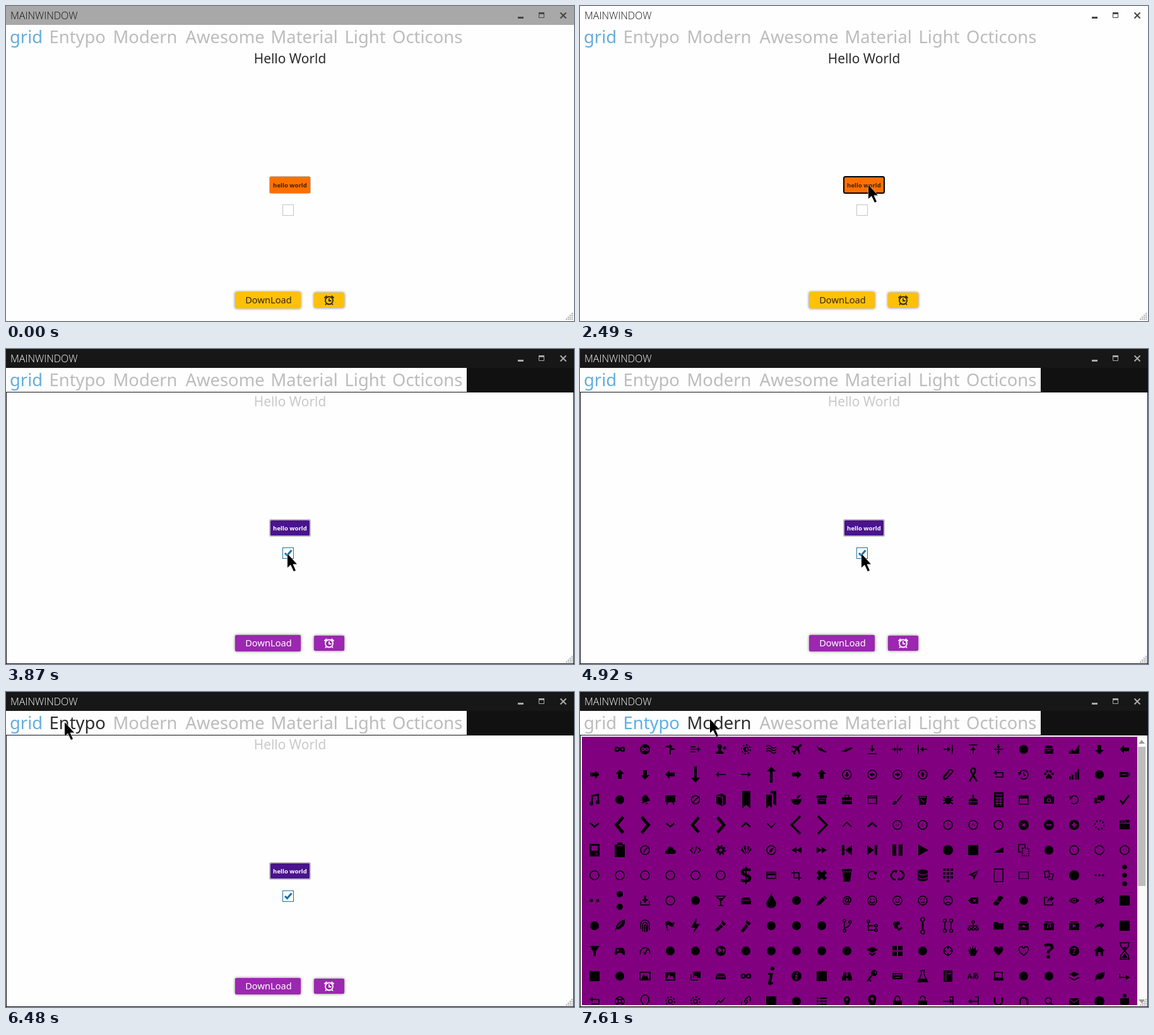
An HTML page that plays this animation: 900 px wide and 500 px high, repeating every 8000 ms.

```html
<!DOCTYPE html>
<html lang="en">
<head>
<meta charset="utf-8">
<title>Main window</title>
<style>
html, body { margin: 0; width: 100%; height: 100%; overflow: hidden; background: #fefefe; }
svg { display: block; }
#stage {
  font-family: "Noto Sans", "Open Sans", "Noto Sans CJK JP", "Noto Sans CJK SC", sans-serif;
  animation: theme 8s step-end infinite, swatch 8s step-end infinite, tabs 8s step-end infinite;
}

/* Light and dark theme, toggled by the check box */
@keyframes theme {
  0%, 56.125%, 66.5% {
    --bar: #fefefe; --body: #fefefe; --title: #111; --btn: #444;
    --hello: #2a2a2a; --ring: #000; --tick: 0;
  }
  48.375%, 61.5%, 70.375% {
    --bar: #171717; --body: #111; --title: #fff; --btn: #aaa;
    --hello: #c9c9c9; --ring: #bbb; --tick: 1;
  }
}
/* Amber and purple swatch, toggled by the middle button */
@keyframes swatch {
  0%, 31.125%, 36% { --accent: #ffc107; --deep: #ff6f00; --on: #33260a; }
  26.25%, 33.75%, 38.625% { --accent: #9c27b0; --deep: #4a148c; --on: #fff; }
}
@keyframes tabs {
  0% { --t0: #64acdc; --t1: #bcbcbc; --t2: #bcbcbc; }
  80.5% { --t0: #64acdc; --t1: #2d2d2d; --t2: #bcbcbc; }
  87.75% { --t0: #bcbcbc; --t1: #2d2d2d; --t2: #bcbcbc; }
  93.5% { --t0: #bcbcbc; --t1: #5bb0e4; --t2: #2d2d2d; }
}
@keyframes wake { 0%, 1% { opacity: 1; } 4.5%, 100% { opacity: 0; } }
@keyframes focus { 0% { visibility: hidden; } 22.9% { visibility: visible; } }
@keyframes check { 0% { stroke: #c4c4c4; } 42.5% { stroke: #1a72a2; } }
@keyframes page { 0% { visibility: hidden; } 87.75% { visibility: visible; } }
@keyframes appear { 0% { visibility: hidden; } 8.25% { visibility: visible; } }
@keyframes move {
  0%, 8.25% { transform: translate(653px, 122px); }
  10.6% { transform: translate(480px, 150px); }
  12.75% { transform: translate(321px, 200px); }
  14.875% { transform: translate(389px, 242px); }
  16.6% { transform: translate(443px, 334px); }
  17.75%, 20% { transform: translate(449px, 300px); }
  20.375%, 22.375% { transform: translate(449px, 296px); }
  26.25%, 40.75% { transform: translate(457px, 284px); }
  42.5%, 44.375% { transform: translate(446px, 322px); }
  48.375% { transform: translate(446px, 325px); }
  72.5% { transform: translate(446px, 325px); animation-timing-function: ease-in-out; }
  81% { transform: translate(93px, 48px); }
  89.875% { transform: translate(93px, 48px); animation-timing-function: ease-in-out; }
  95.125%, 100% { transform: translate(206px, 43px); }
}

#bar { fill: var(--bar); }
#body { fill: var(--body); }
#wake { fill: #a8a8a8; animation: wake 8s linear infinite; }
#title { font: 300 16px "Open Sans", "Noto Sans", sans-serif; fill: var(--title); }
#controls { fill: none; stroke: var(--btn); }
#tabs { font-size: 27.4px; fill: #bcbcbc; }
#hello { font-size: 20.9px; fill: var(--hello); }
#small { font-size: 9.6px; font-weight: 700; fill: var(--on); }
#download { font-size: 14.67px; fill: var(--on); }
#focus { stroke: var(--ring); animation: focus 8s step-end infinite; }
#check { animation: check 8s step-end infinite; }
#tick { opacity: var(--tick); }
#actions { fill: var(--accent); filter: drop-shadow(0 0 2px #0008); }
#alarm { stroke: var(--on); fill: none; }
#page { animation: page 8s step-end infinite; }
#cursor { animation: move 8s linear infinite, appear 8s step-end infinite; }

#icons { color: #000; font-weight: 700; }
#icons .cut { color: purple; }
#icons path, #icons circle { fill: none; }
#icons .f, #icons .d { fill: currentColor; }
#icons .e, #icons .c { fill: purple; }
#icons .s, #icons .o, #icons .h { stroke: currentColor; stroke-width: 1.6; }
#icons .k { stroke: currentColor; stroke-width: 2.7; }
#icons .x { stroke: purple; stroke-width: 1.3; }
#icons .h { stroke-dasharray: 2 1.5; }
#icons .g { stroke: currentColor; stroke-width: 4; stroke-dasharray: 4 2; }
#icons .r { stroke: currentColor; stroke-width: 2; stroke-dasharray: 1; }
#icons text { fill: currentColor; }
</style>
</head>
<body>
<svg id="stage" width="900" height="500" viewBox="0 0 900 500">
  <rect id="body" width="900" height="500"/>
  <rect id="bar" width="900" height="30"/>
  <rect id="wake" width="900" height="30"/>
  <text id="title" x="7" y="21">MAINWINDOW</text>
  <g id="controls">
    <path d="M811 18.5h9" stroke-width="3"/>
    <path d="M844.5 10v8.5h8V10"/><path d="M844 11.5h9" stroke-width="3"/>
    <path d="M878.5 10.5l9 9m0-9l-9 9" stroke-width="2"/>
  </g>
  <rect y="30" width="730" height="38" fill="#fefefe"/>
  <g id="tabs">
    <text x="6" y="59" style="fill:var(--t0)">grid</text>
    <text x="68.5" y="59" style="fill:var(--t1)">Entypo</text>
    <text x="169.5" y="59" style="fill:var(--t2)">Modern</text>
    <text x="284.5" y="59">Awesome</text>
    <text x="419.5" y="59">Material</text>
    <text x="536.5" y="59">Light</text>
    <text x="612" y="59">Octicons</text>
  </g>
  <rect x="1" y="69" width="898" height="430" fill="#fefefe"/>

  <g text-anchor="middle">
    <text id="hello" x="450" y="91">Hello World</text>
    <rect x="417.5" y="270.5" width="65" height="27" rx="2.5" style="fill:var(--deep)" stroke="#bbb"/>
    <rect id="focus" x="418" y="271" width="64" height="26" rx="2.5" fill="none" stroke-width="2"/>
    <text id="small" x="450" y="288">hello world</text>
    <rect id="check" x="438.5" y="315.5" width="17" height="17" fill="#fff"/>
    <path id="tick" d="M442 324l3.5 3.5 7-8" fill="none" stroke="#1272a8" stroke-width="3"/>
    <g id="actions">
      <rect x="363" y="454" width="104" height="26" rx="2"/>
      <rect x="488" y="455" width="48" height="24" rx="2"/>
    </g>
    <text id="download" x="416" y="472">DownLoad</text>
  </g>
  <g id="alarm" stroke-width="1.8">
    <circle cx="512" cy="467.500" r="6"/>
    <path d="M512 464v4h3.500"/>
    <path d="M504.500 463.500l4-3.500M519.500 463.500l-4-3.500" stroke-width="2"/>
    <path d="M508 472l-2 2.500M516 472l2 2.500"/>
  </g>

  <g id="page">
    <rect x="3" y="71" width="893" height="426" fill="#fafafa"/>
    <rect x="3" y="71" width="880" height="426" fill="purple"/>
    <rect x="884" y="87" width="12" height="221" fill="#bdbdbd"/>
    <path d="M885 82l5-6 5 6zM885 488l5 6 5-6z" fill="#999"/>
    <clipPath id="view"><rect x="3" y="71" width="880" height="426"/></clipPath>
    <g id="icons" clip-path="url(#view)"></g>
  </g>
  <path id="grip" stroke="#aaa" stroke-width="2" stroke-dasharray="2 1"
    d="M898 497h-11M898 494h-8M898 491h-5M898 488h-2"/>
  <path id="cursor" d="M0 0V22L5 17.500L10 28L13 26.500L8.500 16.500H15Z"
    stroke="#fff" stroke-width="1" paint-order="stroke"/>
</svg>

<script>
// Parts are split by "|"; the first letter is the drawing style.
// o ring, d disc, c cut disc, r rays, f fill, e cut fill,
// s line, k thick line, x cut line, h dashes, g blocks, t text
const art = {
  _: '', logo: 'd7', ring: 'o7', disc: 'd8', dotted: 'r7',
  arrow: 'fM8 0L1 7V3H-7V-3H1V-7Z',
  thin: 'sM-8 0H6|fM8 0L3 4V-4Z',
  long: 'fM13 0L5 7V2H-13V-2H5V-7Z',
  inf: 'kM0 0C-3-4-7-4-7 0S-3 4 0 0S7-4 7 0S3 4 0 0',
  sign: 'fM-1-8H1V8H-1ZM-8-4L-5-6H3V-3H-5ZM0-2H5L8 0L5 1H0Z',
  add: 'sM-8-4H0M-8 0H0M-8 4H0M1 0H8M4.5-3.5V3.5',
  user: 'fM-8 7C-8 3-4 4-3 1C-6-4-6-8-2-8S3-4 0 1C1 4 5 3 5 7Z|sM3-2H9M6-5V1',
  bright: 'o3.5|fM0-3A3 3 0 0 0 0 3Z|r7', sun: 'o3|r7',
  waves: 'sM-8-4q4-4 8 0t8 0M-8 0q4-4 8 0t8 0M-8 4q4-4 8 0t8 0',
  plane: 'fM8-8C6-9 4-7 2-4L-7-6L-8-4L-1-1L-4 3L-8 2V4L-5 5L-4 8H-2V4L1 1L4 8L6 7L4-2C7-4 9-6 8-8Z',
  jet: 'fM-8-6L-5-3L7 3Q9 6 5 5L-5 1ZM-2-4L3 3L0 2Z',
  edge: 'sM0-7V3M-7 7H7|fM0 4L-4-1H4Z',
  mid: 'sM0-7V7M-8 0H-3M8 0H3|fM-1 0L-5 3V-3ZM1 0L5 3V-3Z',
  crate: 'fM-7-1H7V7H-7ZM-5-6H5L6-2H-6Z|xM-3 2H3',
  area: 'fM-8 7V4L-3 0L0 3L8-7V7Z',
  clip: 'sM-7 3L2-7Q6-9 8-5L-2 6Q-6 8-6 4L2-4M-7 3Q-9 8-4 8',
  ribbon: 'kM-6 11L3-4C6-12-6-12-3-4L6 11',
  back: 'sM-5 4H7V-3H-5|fM-8-3L-3-7V1Z',
  history: 'sM-6-3A7 7 0 1 1-5 5M0-4V0L3 2|fM-9-4L-3-3L-7 2Z',
  paw: 'd2,-6,-1|d2,-2.5,-5|d2,2.5,-5|d2,6,-1|fM0-1C3 0 6 5 4 7Q0 5-4 7C-6 5-3 0 0-1Z',
  bars: 'fM-8 8V3H-5V8ZM-4 8V0H-1V8ZM1 8V-4H4V8ZM5 8V-9H8V8Z',
  battery: 'fM-8-4H6V4H-8ZM7-2H8V2H7Z|xM-5 0H3',
  music: 'kM-4 5V-6L6-8V3|d3,-5,6|d3,5,4',
  bell: 'fM-7 4C-3 2-6-6 1-7S5 2 8 4ZM-2 6H3L1 8Z',
  board: 'fM-8-7H8V4H-8ZM-5 4H-3L-5 8H-7ZM3 4H5L7 8H5Z',
  no: 'o6.5|sM-4 4L4-4',
  book: 'fM-7-7L2-10L8-6V7L2 10L-7 6Z|xM-6-6L3-4V9',
  mark: 'fM-6-14H7V14L0 8L-6 14Z',
  marks: 'fM-8-8H1V14L-3 9L-8 14ZM-1-14H8V10L3 6V-10H-1Z',
  bowl: 'fM-8-1H8C8 4 5 6 3 8H-3C-5 6-8 4-8-1Z|kM1-2L6-8',
  box: 'fM-8-7H8V-3H-8ZM-7-2H7V7H-7Z|xM-3 1H3',
  case: 'fM-8-4H8V7H-8Z|sM-3-4V-7H3V-4|xM-8 1H8',
  browser: 'sM-7-6H7V6H-7ZM-7-3H7',
  brush: 'fM-8 8C-6 2-4 1-1 3C0 6-4 8-8 8ZM-1 1L7-8L8-7L1 3Z',
  bucket: 'fM-7-6H7L5 8H-5Z|xM-5-4H5M-3-1L2 4',
  bug: 'fM-3-4Q0-9 3-4ZM-5-3H5V2Q4 7 0 7T-5 2Z|sM-8-5L-5-2M8-5L5-2M-8 1H8M-8 7L-4 4M8 7L4 4',
  cake: 'fM-7 0Q0-5 7 0V8H-7Z|kM0-3V-8|xM-7 3H7',
  calc: 'fM-7-12H8V12H-7Z|xM-5-8H6M-5-3H6M-5 2H6M-5 6H6M-2-3V10M3-3V10',
  calendar: 'sM-7-6H7V7H-7ZM-4-8V-4M4-8V-4|fM-7-6H7V-2H-7Z',
  camera: 'fM-8-5H-4L-2-8H3L5-5H8V6H-8Z|c3.5,0,1|d2,0,1',
  ccw: 'sM-5-4A6.5 6.5 0 1 1-5 4|fM-8-6L-2-4L-6 0Z',
  cw: 'sM5-4A6.5 6.5 0 1 0 5 4|fM8-6L2-4L6 0Z',
  chat: 'fM-3-7H8V1H5V4L2 1H-3ZM-8-3H-4V3H2V5H-4L-6 8V5H-8Z',
  check: 'kM-7 1L-3 6L7-7',
  chev: 'kM-7-3L0 3L7-3', slim: 'sM-7-3L0 4L7-3',
  minus: 'kM-4 0H4', plus: 'kM-4 0H4M0-4V4',
  clap: 'fM-8-2H8V7H-8ZM-8-7L7-8L8-4L-8-3Z|xM-5-7L-3-4M0-7L2-4',
  mac: 'fM-8-10H8V10H-8Z|eM-5-7H5V1H-5Z|xM1 6H5',
  clipboard: 'fM-8-9H-4V-12H4V-9H8V11H-8Z|xM-4-7H4',
  clock: 'o7|sM-2 4L0 0L4-4M0 0L-1-1',
  cloud: 'fM-5 6C-10 6-9 0-5 0C-4-7 4-7 5-1C10-1 10 6 5 6Z',
  code: 'sM-4-4L-8 0L-4 4M4-4L8 0L4 4M2-6L-2 6',
  cog: 'd6|r7|c2.5',
  fan: 'fM-1 7L-9-1L-6-4ZM0 7L-4-7H0ZM1 7L3-7L6-5ZM2 7L7-3L9-1Z',
  compass: 'o7|fM4-4L1 2L-4 4L-1-2Z',
  ff: 'fM-8-5L0 0L-8 5ZM0-5L8 0L0 5Z',
  next: 'fM-8-8L3 0L-8 8ZM4-8H8V8H4Z',
  pause: 'fM-8-9H-2V9H-8ZM2-9H8V9H2Z',
  play: 'fM-7-9L9 0L-7 9Z', stop: 'fM-8-8H8V8H-8Z', vol: 'fM-8 4L8-5V4Z',
  copy: 'sM-3 3H-8V-9H2V-4|hM-2-3H8V9H-2Z',
  dollar: 't34$', card: 'sM-7-5H7V5H-7Z|fM-7-3H7V0H-7Z',
  crop: 'sM-4-8V4H8M-8-4H4V8',
  cup: 'fM-8-10H8V-6H-8ZM-7-5H7L5 10H-5Z',
  cycle: 'kM-3 7A7 7 0 0 1-3-7M3-7A7 7 0 0 1 3 7|fM-6-8H0L-2-3ZM6 8H0L2 3Z',
  db: 'fM-8-7Q0-12 8-7V7Q0 12-8 7Z|xM-8-3Q0 2 8-3M-8 3Q0 8 8 3',
  dial: 'gM-6-11V7M0-11V13M6-11V7',
  nav: 'fM8-8L1 8L-1 1L-8-1Z|xM5-5L0 0',
  page: 'sM-7-10H7V10H-7Z',
  docs: 'sM-7-6L0-7L1 2L-6 4ZM2-3L7-2L5 7L-1 6',
  dots: 'd1.7,-6|d1.7|d1.7,6', pair: 'd2.5,-5|d2.5,5',
  download: 'fM-1.5-8H1.5V-2H5L0 4L-5-2H-1.5Z|sM-7 1V7H7V1',
  glass: 'sM-7-7H7L0 1ZM0 0V8M-4 8H4|fM-5-4H5L0 2Z',
  drive: 'fM-8 0H8V6H-8ZM-5-5H5L8-1H-8Z',
  drop: 'fM0-12C2-5 8 1 8 5A8 7 0 0 1-8 5C-8 1-2-5 0-12Z',
  pencil: 'fM-8 8L-7 3L4-8L8-4L-3 7Z|xM2-6L6-2', at: 't17@',
  face: 'o7|d1,-2.5,-2|d1,2.5,-2',
  grin: 'sM-4 1Q0 7 4 1', flat: 'sM-3 3H3', frown: 'sM-4 5Q0 0 4 5',
  erase: 'fM-8 0L-3-5H8V5H-3Z|xM0-2L4 2M4-2L0 2',
  rubber: 'fM-8 4L2-8L8-5L-1 8L-7 7Z|xM-4 0L3 3',
  share: 'sM-2-5H-7V7H6V3|fM8-3L3-8V-5Q-2-4-3 3Q0-1 3-1V2Z',
  eye: 'fM-8 0Q0-9 8 0Q0 9-8 0Z|c3|d1.8', slash: 'sM-7 7L7-7',
  feather: 'fM-8 10L-6 2Q-5-6 8-10Q9 0 3 2Q0 7-5 5Z|xM-3 2L4-6',
  print: 'sM-7 5V-2A7 7 0 0 1 7-2V7M-4 9V-1A4 4 0 0 1 4-1V9M-1 10V0Q0-3 2 0V10',
  flag: 'fM-8-6Q-3-9 0-6T7-6L5 1Q2 3-1 0T-5 0L-3 8H-5Z',
  flash: 'fM2-13L-7 3H-1L-4 13L7-3H1Z',
  torch: 'fM-8 6L0-2L2-7L7-2L3 1L-5 8Z|xM0-3L4 1',
  branch: 'o2,-4,-8|o2,5,-6|o2,-4,8|sM-4-6V6M5-4Q5 1-4 4',
  cascade: 'o2,-6,-7|o2,6,0|o2,6,7|sM-6-5V7H4M-6 0H4',
  flower: 'd3,-4,-3|d3,1,-4|d3,-2,2|sM2 8L0 2|fM2 7Q3 2 8 2Q7 7 2 7Z',
  line: 'o3,0,-10|o3,0,10|kM0-7V7',
  twin: 'o2.5,-5,-8|o2.5,5,-8|o2.5,-5,8|o2.5,5,8|sM-5-5V5M5-5V5',
  tree: 'o2,0,-6|o2,-6,5|o2,0,5|o2,6,5|sM0-4V3M-6 3V0H6V3',
  folder: 'fM-8-6H-2L0-4H8V6H-8Z', bin: 'fM-8-4H8V7H-8ZM-6-7H6V-5H-6Z',
  fwd: 'fM8-1L2-6V-3Q-6-3-8 5Q-3 1 2 1V5Z',
  funnel: 'fM-8-8H8L2 1V7L-2 9V1Z',
  pad: 'fM-5-5H5Q9 0 8 6Q5 8 3 3H-3Q-5 8-8 6Q-9 0-5-5Z|xM-5-1H-1M-3-3V1',
  gauge: 'sM-7 5A7.5 7.5 0 1 1 7 5M0 4L4-3|d2,0,4',
  globe: 'd8|eM-5-5L0-4L1 0L-3 3ZM3-4L7-2L4 4Z',
  cap: 'fM-9-2L0-7L9-2L0 3ZM-5 2L0 5L5 2V5L0 8L-5 5Z',
  four: 'fM-8-8H-1V-1H-8ZM1-8H8V-1H1ZM-8 1H-1V8H-8ZM1 1H8V8H1Z',
  target: 'o6.5|sM0-8V-3M0 8V3M-8 0H-3M8 0H3',
  hand: 'fM-4 8Q-7 2-8-3L-4 0L-6-8L-2-2L-1-9L1-2L4-8V0L8-2Q5 4 3 8Z',
  heart: 'fM0 7C-14-2-5-12 0-4C5-12 14-2 0 7Z',
  love: 'sM0 7C-14-2-5-12 0-4C5-12 14-2 0 7Z',
  help: 't34?', home: 'fM-9 0L0-8L9 0H6V8H2V2H-2V8H-6V0Z',
  sand: 'sM-7-13H7L6-7L0 0L6 7L7 13H-7L-6 7L0 0L-6-7Z|fM-5 11L0 4L5 11ZM-4-6H4L0-2Z',
  frame: 'sM-8-6H8V6H-8Z', slab: 'fM-8-6H8V7H-8Z', peaks: 'fM-6 5L-2-3L1 1L3-1L6 5Z',
  stack: 'fM-4-7H8V3H-4Z|sM-7-3V6H4',
  inbox: 'fM-8 1L-5-4H5L8 1V5H-8Z|xM-6 1H6',
  info: 'd3,2,-12|fM-5-5H3L0 9Q1 11 4 9L2 13Q-6 16-5 10L-2-2H-5Z',
  tray: 'fM-8 3L-5-6H-1V0H1V-6H5L8 3V7H1V3H-1V7H-8Z',
  key: 'd5,3,-5|c1.5,5,-6|kM1-3L-8 8M-5 5L-2 8',
  keys: 'fM-8-5H8V5H-8Z|xM-6-2H6M-4 2H4',
  flask: 'sM-2-9V-3L-8 9H8L2-3V-9M-4-9H4|fM-5 4H5L7 8H-7Z',
  notes: 'fM-7-9H7V9H-7Z|xM-3-8V8M0-4H5',
  lang: 't11Aあ', laptop: 'sM-6-6H6V3H-6Z|fM-9 4H9L7 7H-7Z',
  layers: 'fM-8-3L0-7L8-3L0 1ZM-8 1L0 5L8 1V3L0 7L-8 3Z',
  leaf: 'fM-8 7Q-6 5-6 2C-6-6 4-4 8-7Q9 6-2 5Q-6 5-7 8Z',
  level: 'sM-8-4V2H3|fM8 2L2 6V-2Z',
  buoy: 'o7|o3|kM-5-5L-2-2M5 5L2 2M5-5L2-2M-5 5L-2 2',
  bulb: 'sM-3 9V4C-9-1-6-10 0-10S9-1 3 4V9Z',
  graph: 'sM-8 5L-3-1L0 2L7-6M-8 7H8',
  link: 'sM-1 2C-4-1 0-4 3-7S9-3 6 0M1-2C4 1 0 4-3 7S-9 3-6 0',
  list: 'kM-8-5H-5M-3-5H8M-8 0H-5M-3 0H8M-8 5H-5M-3 5H8',
  pin: 'fM0 9C-7 0-6-8 0-8S7 0 0 9Z|c2,0,-3',
  lock: 'fM-7-1H7V9H-7Z|sM-4-1V-5Q0-12 4-5V-1',
  open: 'fM-7-1H7V9H-7Z|sM-4-4V-5Q0-12 4-5V-1',
  door: 'sM2-7H8V7H2', magnet: 'kM-6 6V0A6 6 0 0 1 6 0V6',
  search: 'o5,-1,-1|kM3 3L8 8', mail: 'fM-8-5H8V6H-8Z|xM-8-4L0 2L8-4',
  man: 'd3,0,-9|fM-7-5H7V5H4V12H-4V5H-7Z'
};

// "+" lays one icon over another, "~" cuts it out, "@" turns, "*" scales
const rows = [
  '_ inf disc~inf*.7 sign add user bright waves plane jet jet@-50 edge mid edge@90 edge@-90 edge@180 mid@90 logo crate area arrow@90 arrow@180',
  'arrow arrow@-90 arrow@90 arrow@180 long@90 thin@180 thin long@-90 arrow arrow@-90 ring+arrow@90*.5 ring+arrow@180*.5 ring+arrow*.5 ring+arrow@-90*.5 clip ribbon back history paw bars logo battery',
  'music logo bell@-20 board no book mark marks bowl box case browser brush bucket bug cake calc calendar camera ccw chat check',
  'chev chev@90*1.8 chev@-90*1.8 chev*.9 chev@90*1.7 chev@-90*1.7 chev@180 slim slim@90*2 slim@-90*2 slim@180 chev@180 ring+slim*.4 ring+slim@90*.4 ring+slim@-90*.4 ring+slim@180*.4 ring disc~plus@45*.8 disc~minus disc~plus dotted clap',
  'mac clipboard clock cloud code cog fan compass ff@180 ff next@180 next pause play disc stop vol copy logo ring ring ring',
  'ring ring ring ring ring ring dollar card crop plus@45*2.2 cup cw cycle db dial nav page page@90*.75 docs disc dots dots@90*2.2',
  'pair pair@90*2 download ring logo glass drive drop logo pencil at face+grin face+grin*.8 face+flat face+frown erase rubber logo share eye eye+slash stop',
  'logo feather print flag flash torch*1.2 torch@-10*1.2 logo logo logo branch cascade flower line twin tree folder bin~peaks*.5 bin~music*.4 bin~play*.35 fwd stop',
  'funnel pad gauge logo logo globe logo logo logo logo logo cap four logo target hand heart love help disc~help*.4 home sand',
  'stop logo frame+peaks slab~peaks stack~peaks*.5 inbox inf info disc~info*.4 stop tray key keys flask notes lang laptop logo logo layers leaf level',
  'back buoy bulb sun sun graph link stop logo list pin pin*1.3 lock open thin+door thin@180+door magnet@180 magnet search mail disc man'
];

function part(spec) {
  const kind = spec[0], data = spec.slice(1);
  if ('odcr'.includes(kind)) {
    const [r, x = 0, y = 0] = data.split(',');
    return `<circle class="${kind}" r="${r}" cx="${x}" cy="${y}" pathLength="16"/>`;
  }
  if (kind === 't') {
    const size = parseInt(data);
    return `<text font-size="${size}" y="${size * .36}" text-anchor="middle">${data.slice(2)}</text>`;
  }
  return `<path class="${kind}" d="${data}"/>`;
}

function layer(token) {
  const [, join, name, turn = 0, scale = 1] =
    token.match(/^([+~]?)(\w+)(?:@(-?\d+))?(?:\*([\d.]+))?$/);
  const shapes = art[name] ? art[name].split('|').map(part).join('') : '';
  return `<g class="${join === '~' ? 'cut' : ''}" transform="rotate(${turn}) scale(${scale})">${shapes}</g>`;
}

document.getElementById('icons').innerHTML = rows.map((row, r) =>
  row.split(' ').map((icon, c) =>
    `<g transform="translate(${23 + 40 * c} ${91 + 40 * r})">` +
    icon.split(/(?=[+~])/).map(layer).join('') + '</g>').join('')).join('');
</script>
</body>
</html>
```
